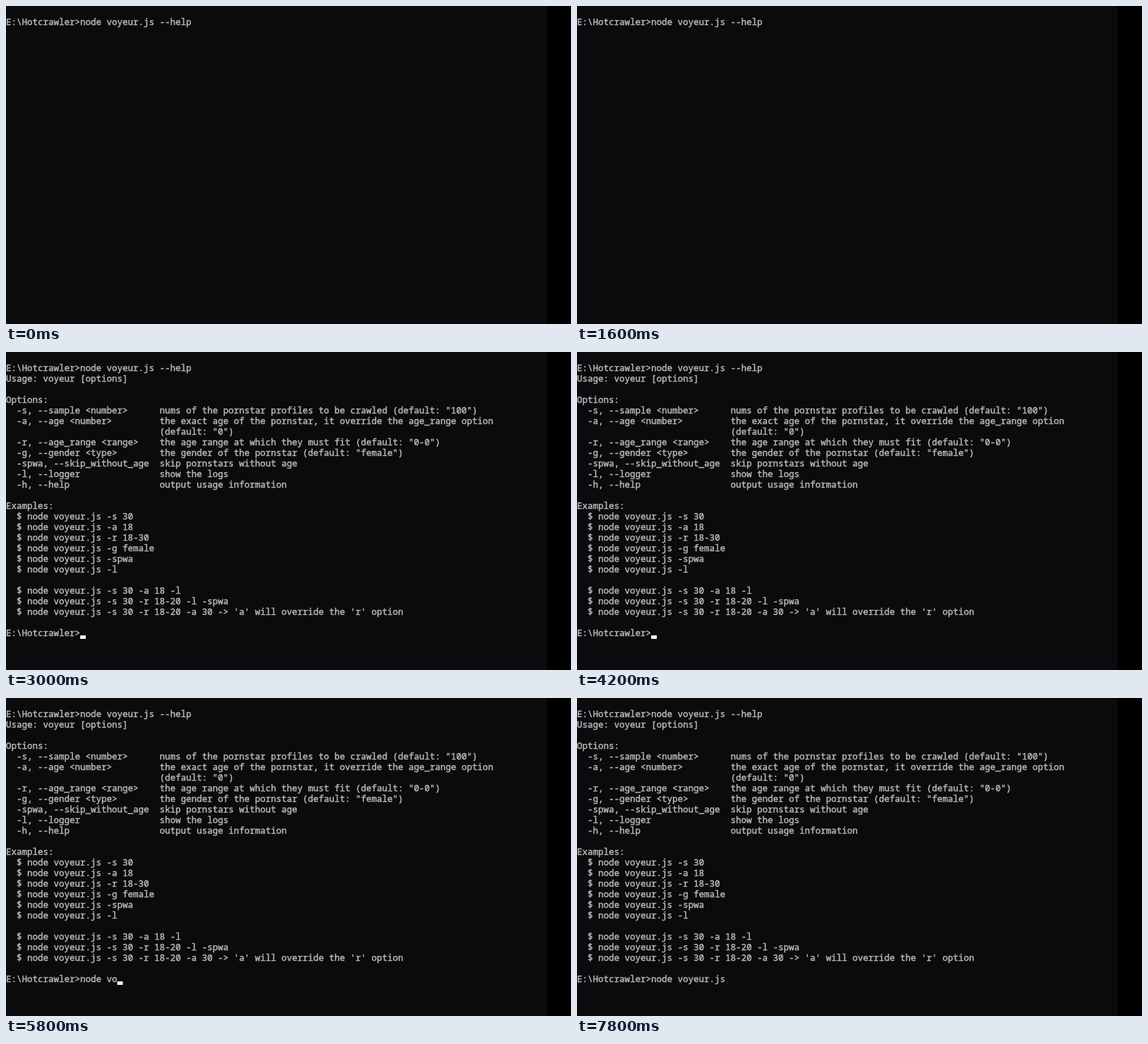
Animation of 800 by 450 pixels, one loop 8000 ms. Source, as an HTML page:

```html
<!DOCTYPE html>
<html lang="en">
<head>
<meta charset="utf-8">
<title>Command line help</title>
<style>
  html, body {
    margin: 0;
    width: 100%;
    height: 100%;
    overflow: hidden;
    background: #000;
  }
  #screen {
    position: absolute;
    left: 0;
    top: 0;
    width: 766px;
    height: 450px;
    overflow: hidden;
    background: #0b0a0c;
  }
  pre {
    position: absolute;
    left: 0;
    top: 15px;
    margin: 0;
    font: 12.5px/15px "Noto Sans Mono", "DejaVu Sans Mono", monospace;
    font-variant-ligatures: none;
    color: #b8b8b8;
    -webkit-text-stroke: 0.45px #b8b8b8;
  }
  #cursor {
    position: absolute;
    left: 0;
    top: 0;
    width: 8px;
    height: 5px;
    background: #f2f2f2;
  }
</style>
</head>
<body>
<div id="screen">
  <pre id="text"></pre>
  <div id="cursor"></div>
</div>
<script>
const LOOP = 8000;
const CELL = 7.5;
const ROW = 15;
const PROMPT = "E:\\Hotcrawler>";
const COMMAND = PROMPT + "node voyeur.js --help";
const NEXT = "node voyeur.js";

const option = (flags, info) => ("  " + flags).padEnd(29) + info;
const example = args => "  $ node voyeur.js " + args;

const HELP = [
  "Usage: voyeur [options]",
  "",
  "Options:",
  option("-s, --sample <number>", 'nums of the pornstar profiles to be crawled (default: "100")'),
  option("-a, --age <number>", "the exact age of the pornstar, it override the age_range option"),
  " ".repeat(29) + '(default: "0")',
  option("-r, --age_range <range>", 'the age range at which they must fit (default: "0-0")'),
  option("-g, --gender <type>", 'the gender of the pornstar (default: "female")'),
  option("-spwa, --skip_without_age", "skip pornstars without age"),
  option("-l, --logger", "show the logs"),
  option("-h, --help", "output usage information"),
  "",
  "Examples:",
  ...["-s 30", "-a 18", "-r 18-30", "-g female", "-spwa", "-l"].map(example),
  "",
  example("-s 30 -a 18 -l"),
  example("-s 30 -r 18-20 -l -spwa"),
  example("-s 30 -r 18-20 -a 30 -> 'a' will override the 'r' option"),
  ""
];

// Each step: start time, cursor row, typed characters, cursor visible
const STEPS = [
  [0, 0, 0, false],
  [1000, 0, 0, true],
  [1600, 0, 0, false],
  [1800, 1, 0, true],
  [2000, 1, 0, false],
  [2600, 1, 0, true],
  [3000, 25, 0, true],
  [3600, 25, 0, false],
  [4200, 25, 0, true],
  [4400, 25, 2, true],
  [4600, 25, 3, false],
  [4800, 25, 4, true],
  [5200, 25, 5, true],
  [5600, 25, 6, true],
  [5800, 25, 7, true],
  [6200, 25, 14, true],
  [6800, 25, 14, false],
  [7400, 25, 14, true],
  [7800, 25, 14, false]
];

const text = document.getElementById("text");
const cursor = document.getElementById("cursor");

function show([, row, typed, visible]) {
  const lines = [COMMAND];
  if (row > 1) lines.push(...HELP, PROMPT + NEXT.slice(0, typed));
  text.textContent = lines.join("\n");

  const column = row === 0 ? COMMAND.length : row === 1 ? 0 : PROMPT.length + typed;
  cursor.style.visibility = visible ? "visible" : "hidden";
  cursor.style.transform = `translate(${column * CELL}px, ${26 + row * ROW}px)`;
}

const start = performance.now();
let current;

function tick() {
  const time = (performance.now() - start) % LOOP;
  const step = STEPS.findLast(s => s[0] <= time) || STEPS[0];
  if (step !== current) show(current = step);
  requestAnimationFrame(tick);
}
tick();
</script>
</body>
</html>
```
